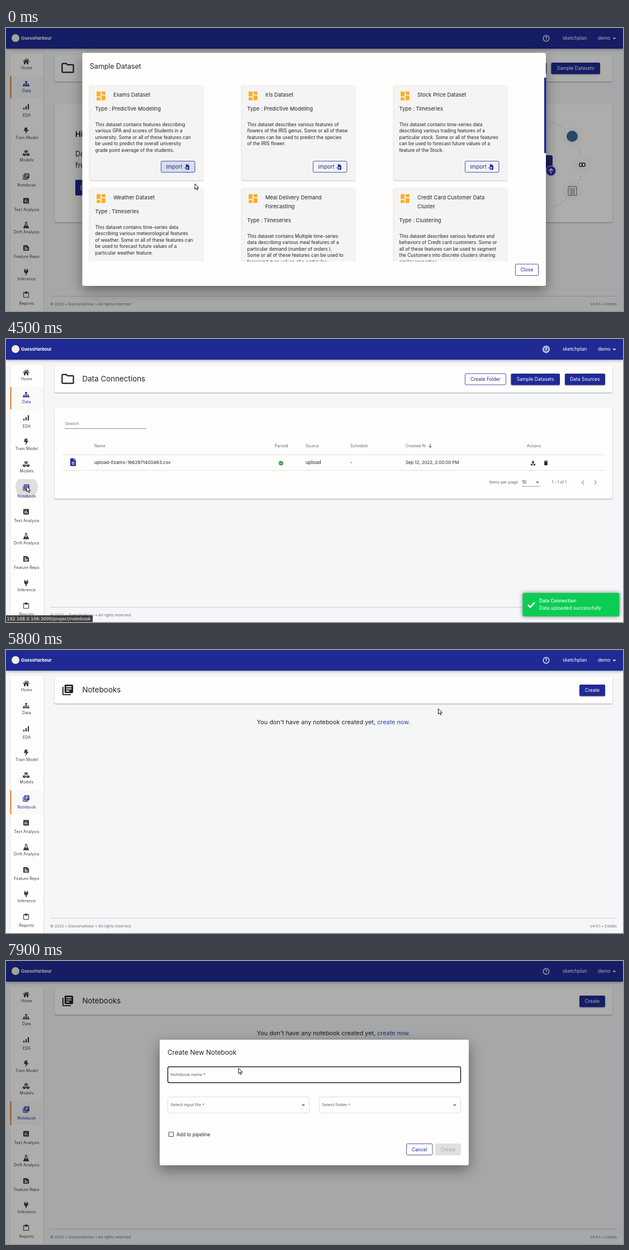
Recreate the animation shown at these times as an HTML page with a canvas. Size 1104 px wide and 507 px high, loop 8 s.

```html
<!DOCTYPE html>
<html lang="en">
<head>
<meta charset="utf-8">
<style>
html, body { margin: 0; width: 100%; height: 100%; overflow: hidden; background: #f4f6f8; }
canvas { display: block; width: 1104px; height: 507px; }
</style>
</head>
<body>
<canvas id="stage"></canvas>
<script>
const W = 1104, H = 507, LOOP = 8000;
const NAVY = '#1f2a95', WHITE = '#fffefd', DARK = '#222', GREY = '#6b7076', PAGE = '#f4f6f8';
const BRAND = 'GuessHarbour', PROJECT = 'sketchplan', USER = 'demo';
const canvas = document.getElementById('stage');
const dpr = window.devicePixelRatio || 1;
canvas.width = W * dpr;
canvas.height = H * dpr;
const ctx = canvas.getContext('2d');

// Icons on a 24 unit grid, then the two pointers at full size
const ICONS = {
  home: 'M12 6.500l-7 6V21h5v-6h4v6h5v-8.500zM1 12L12 2.500l4 3.400V4h3v4.500l4 3.500-1.200 1.400L12 5 2.200 13.400z',
  sitemap: 'M9 3h6v5h-2v3h7v4h2v5h-6v-5h2v-2h-5v2h2v5H9v-5h2v-2H6v2h2v5H2v-5h2v-4h7V8H9z',
  bars: 'M3 15h4v6H3zM10 10h4v11h-4zM17 4h4v17h-4z',
  bolt: 'M8 2h9l-3 7h6L9 23l2.500-10H5z',
  cubes: 'M12 2l5 2.300v5L12 11.600 7 9.300v-5zM6.300 12l5 2.300v5l-5 2.300-5-2.300v-5zM17.700 12l5 2.300v5l-5 2.300-5-2.300v-5zM12 4l-3 1.200 3 1.300 3-1.300zM6.300 14l-3 1.200 3 1.300 3-1.300zM17.700 14l-3 1.200 3 1.300 3-1.300z',
  books: 'M4 6H2v14q0 2 2 2h14v-2H4zM8 2h12q2 0 2 2v12q0 2-2 2H8q-2 0-2-2V4q0-2 2-2zM9 5v2h10V5zM9 9v2h10V9zM9 13v2h6v-2z',
  chart: 'M5 3h14q2 0 2 2v14q0 2-2 2H5q-2 0-2-2V5q0-2 2-2zM7 10v7h2v-7zM11 7v10h2V7zM15 13v4h2v-4z',
  flask: 'M8 2h8v2h-1v5l6 11q1 2-1 2H4q-2 0-1-2L9 9V4H8zM11 4v6l-2 4h6l-2-4V4z',
  note: 'M5 3h10l6 6v10q0 2-2 2H5q-2 0-2-2V5q0-2 2-2zM7 8v2h5V8zM7 12v2h10v-2zM7 16v2h10v-2z',
  plug: 'M7 2h3v5h4V2h3v5h2v3h-1c0 4-2 6-4.500 6.500V22h-3v-5.500C8 16 6 14 6 10H5V7h2z',
  clipboard: 'M19 3h-4q-1-2-3-2T9 3H5q-2 0-2 2v14q0 2 2 2h14q2 0 2-2V5q0-2-2-2zM5 5h2v3h10V5h2v14H5z',
  folder: 'M10 4H4q-2 0-2 2v12q0 2 2 2h16q2 0 2-2V8q0-2-2-2h-8zM4 6h5.200l2 2H20v10H4z',
  file: 'M4 1h10v6h6v16H4zM15 1l5 5h-5zM8 11v1.600h8V11zM8 14.200v1.600h8v-1.600zM8 17.400V19h8v-1.600z',
  download: 'M10 3h4v7h4l-6 6-6-6h4zM3 16h4l5 4 5-4h4v5H3z',
  trash: 'M6 7h12v12q0 2-2 2H8q-2 0-2-2zM19 4h-3.500l-1-1h-5l-1 1H5v2h14z',
  tiles: 'M3 3h8v10H3zM3 15h8v6H3zM13 11h8v10h-8zM13 3h8v6h-8z',
  importFile: 'M7 1h8v6h6v16H7v-6h5v3l5-4.500-5-4.500v3H7zM16 1l5 5h-5zM1 14h6v3H1z',
  arrow: 'M0 0v11l2.600-2.400 1.800 3.900 1.700-.8-1.800-3.700h3.400z',
  hand: 'M3 0q1.300 0 1.300 1.500v3l4 1q1 .4.8 1.500l-.8 4H3.500L0 6.500q.6-1.200 2-.2V1.500Q1.800 0 3 0z'
};
const PATHS = Object.fromEntries(Object.entries(ICONS).map(([k, d]) => [k, new Path2D(d)]));

// label, icon, icon y, label y, item top, item bottom, link
const MENU = [
  ['Home', 'home', 60, 72, 46, 86],
  ['Data', 'sitemap', 100, 112.500, 86, 126],
  ['EDA', 'bars', 141, 157, 126, 170],
  ['Train Model', 'bolt', 184, 197, 170, 210, 'training'],
  ['Models', 'cubes', 224, 237, 210, 251, 'models'],
  ['Notebook', 'books', 266, 281.500, 251, 294, 'notebook'],
  ['Text Analysis', 'chart', 309.500, 325.500, 294, 339, 'textanalysis'],
  ['Drift Analysis', 'flask', 353, 365.500, 339, 379],
  ['Feature Repo', 'note', 394, 409.500, 379, 423],
  ['Inference', 'plug', 437, 450, 423, 464],
  ['Reports', 'clipboard', 478, 494, 464, 507]
];

const DATASETS = [
  [['Exams Dataset'], 'Predictive Modeling', ['This dataset contains features describing', 'various GPA and scores of Students in a',
    'university. Some or all of these features can', 'be used to predict the overall university', 'grade point average of the students.']],
  [['Iris Dataset'], 'Predictive Modeling', ['This dataset describes various features of', 'flowers of the IRIS genus. Some or all of these',
    'features can be used to predict the species', 'of the IRIS flower.']],
  [['Stock Price Dataset'], 'Timeseries', ['This dataset contains time-series data', 'describing various trading features of a',
    'particular stock. Some or all of these features', 'can be used to forecast future values of a', 'feature of the Stock.']],
  [['Weather Dataset'], 'Timeseries', ['This dataset contains time-series data', 'describing various meteorological features',
    'of weather. Some or all of these features can', 'be used to forecast future values of a', 'particular weather feature.']],
  [['Meal Delivery Demand', 'Forecasting'], 'Timeseries', ['This dataset contains Multiple time-series', 'data describing various meal features of a',
    'particular demand (number of orders ).', 'Some or all of these features can be used to', 'forecast future values of a particular']],
  [['Credit Card Customer Data', 'Cluster'], 'Clustering', ['This dataset describes various features and', 'behaviors of Credit card customers. Some or',
    'all of these features can be used to segment', 'the Customers into discrete clusters sharing', 'similar properties.']]
];

// time, x, y of the pointer tip
const POINTER = [
  [0, 338, 279], [400, 330, 276], [1000, 40, 196], [1200, 15, 189], [1800, 15, 190], [2200, 27, 228],
  [2700, 30, 268], [3100, 28, 312], [3600, 30, 312], [4000, 36, 267], [4300, 37, 264], [4850, 37, 264],
  [5000, 177, 227], [5450, 640, 115], [6300, 1000, 88], [6700, 1030, 72], [7200, 1030, 72], [7650, 450, 180], [7900, 416, 192], [8000, 416, 192]
];

const clamp = v => Math.max(0, Math.min(1, v));
const ramp = (t, a, b) => clamp((t - a) / (b - a));
const within = (t, a, b) => t >= a && t < b;

function rect(x, y, w, h, fill, r = 0, stroke, lw = 1) {
  ctx.beginPath();
  ctx.roundRect(x, y, w, h, r);
  if (fill) { ctx.fillStyle = fill; ctx.fill(); }
  if (stroke) { ctx.strokeStyle = stroke; ctx.lineWidth = lw; ctx.stroke(); }
}
function circle(x, y, r, fill, stroke, lw = 1) {
  rect(x - r, y - r, 2 * r, 2 * r, fill, r, stroke, lw);
}
function raised(x, y, w, h, fill = WHITE, r = 2, blur = 2, dy = 1, alpha = .35) {
  ctx.save();
  ctx.shadowColor = `rgba(0,0,0,${alpha})`;
  ctx.shadowBlur = blur * dpr;
  ctx.shadowOffsetY = dy * dpr;
  rect(x, y, w, h, fill, r);
  ctx.restore();
}
function line(points, color, lw = 1) {
  ctx.beginPath();
  points.forEach(p => ctx.lineTo(...p));
  ctx.strokeStyle = color;
  ctx.lineWidth = lw;
  ctx.stroke();
}
function text(s, x, y, size, color = DARK, { align = 'left', weight = 400, font = 'Inter', spacing = 0 } = {}) {
  ctx.font = `${weight} ${size}px "${font}", sans-serif`;
  ctx.textAlign = align;
  ctx.textBaseline = 'middle';
  ctx.letterSpacing = spacing + 'px';
  ctx.fillStyle = color;
  ctx.fillText(s, x, y);
  return ctx.measureText(s).width;
}
function icon(name, cx, cy, size, color) {
  ctx.save();
  ctx.translate(cx - size / 2, cy - size / 2);
  ctx.scale(size / 24, size / 24);
  ctx.fillStyle = color;
  ctx.fill(PATHS[name], 'evenodd');
  ctx.restore();
}
function caret(x, y, color, s = 3) {
  ctx.beginPath();
  ctx.moveTo(x - s, y - s / 2);
  ctx.lineTo(x + s, y - s / 2);
  ctx.lineTo(x, y + s / 2);
  ctx.fillStyle = color;
  ctx.fill();
}
function button(label, x, y, w, h, solid, fill = NAVY) {
  if (solid) raised(x, y, w, h, fill);
  else rect(x + .5, y + .5, w - 1, h - 1, null, 2, NAVY, .8);
  text(label, x + w / 2, y + h / 2 + .5, 8.450, solid ? '#fff' : NAVY, { align: 'center' });
}
function shade(alpha) {
  ctx.fillStyle = `rgba(0,0,0,${alpha})`;
  ctx.fillRect(0, 0, W, H);
}
// Fades the content area in from the page colour
function veil(shown) {
  ctx.globalAlpha = 1 - shown;
  rect(70, 40, W - 70, 439, PAGE);
  ctx.globalAlpha = 1;
}

function drawHeader(t) {
  raised(0, 0, W, 37, NAVY, 0, 5, 1, .4);
  circle(17, 18, 7, '#f3efe6');
  text(BRAND, 27, 19, 7.700, '#fff', { weight: 700 });
  const pulse = Math.max(0, Math.cos((t - 4600) / 1000 * Math.PI));
  circle(966.500, 18.500, 7.200, `rgba(255,255,255,${.3 * pulse})`);
  circle(966.500, 18.500, 5.300, null, '#fff', 1.200);
  text('?', 966.500, 19, 8, '#fff', { align: 'center', weight: 700 });
  text(PROJECT, 996, 18.500, 8.500, '#fff');
  text(USER, 1059, 18.500, 8.500, '#fff');
  caret(1088.500, 19, '#fff');
}

function drawFooter() {
  line([[79, 480.500], [1093, 480.500]], '#cbcdcf');
  text(`© 2022 • ${BRAND} • All rights reserved`, 79, 495, 6.750, GREY);
  text('v4.9.1 • Credits', 1093, 495, 6.650, GREY, { align: 'right' });
}

function hoveredItem(t, p) {
  return within(t, 950, 4850) && p[0] < 67 ? MENU.findIndex(m => p[1] + 3 >= m[4] && p[1] + 3 < m[5]) : -1;
}

function drawSidebar(t, hovered) {
  raised(8, 46, 59.500, 470, WHITE, 0, 2, 0, .15);
  const active = t < 4600 ? 1 : 5;
  const [, , , , top, bottom] = MENU[active];
  rect(8, top, 59, bottom - top, 'rgba(0,0,0,.02)');
  if (within(t, 4400, 5100)) {
    ctx.save();
    ctx.beginPath();
    ctx.rect(8, 251, 59, 43);
    ctx.clip();
    circle(37, 265, 20 * (t - 4400) / 100, `rgba(0,0,0,${.12 * (1 - ramp(t, 4780, 5100))})`);
    ctx.restore();
  }
  rect(7.500, top, 2, bottom - top, '#e07c1c');
  MENU.forEach(([label, name, iconY, labelY], i) => {
    const color = i === active || i === hovered ? NAVY : '#3b3b3b';
    icon(name, 36, iconY, 13.500, color);
    text(label, 37, labelY, 6.900, color, { align: 'center', spacing: .2 });
  });
}

function drawTitleCard(name, title) {
  raised(87, 48, 998, 48);
  icon(name, 110.500, 71.500, name === 'folder' ? 27 : 23, DARK);
  text(title, 136.500, 72, 13.400);
}

function drawEmptyPage() {
  drawTitleCard('folder', 'Data Connections');
  button('Data Sources', 880, 62, 87, 20, true);
  button('Sample Datasets', 975.500, 62, 87.500, 20.500, true);
  raised(87, 137, 998, 211);
  text('Hi', 124, 191, 13, DARK, { weight: 700 });
  text('Do', 124, 226, 12.500);
  text('fru', 124, 246, 12.500);
  rect(124, 272, 60, 28, NAVY, 2);
  rect(134, 282, 8, 8, null, 1, '#fff');
  ctx.setLineDash([2, 4]);
  ctx.beginPath();
  ctx.arc(950, 245, 81, -1.300, 1.300);
  ctx.strokeStyle = '#999';
  ctx.lineWidth = 1;
  ctx.stroke();
  ctx.setLineDash([]);
  for (const [x, y] of [[1013, 194], [1031, 245], [1013, 292]]) circle(x, y, 17, '#fafafa');
  circle(1013, 194, 10, '#386b96');
  rect(1026, 242, 5, 6, null, 2, DARK, 1.500);
  rect(1031, 242, 5, 6, null, 2, DARK, 1.500);
  rect(1006, 284, 15, 16, null, 1, '#555');
  for (let y = 288; y < 299; y += 3) line([[1009, y], [1018, y]], '#555');
  rect(955, 228, 23, 24, '#292a83', 3);
  circle(975, 256, 9, '#3830b5', '#eee');
  line([[971, 256], [975, 252], [979, 256]], '#fff', 1.500);
  line([[975, 252], [975, 261]], '#fff', 1.500);
}

function drawDataPage() {
  drawTitleCard('folder', 'Data Connections');
  button('Create Folder', 821, 61.500, 74, 21, false);
  button('Sample Datasets', 903.500, 62, 87.500, 20.500, true);
  button('Data Sources', 1000, 62, 72, 20.500, true);
  raised(87, 124, 998, 162);
  text('Search', 105.500, 152, 8.100, '#777', { font: 'Roboto' });
  line([[105, 160.500], [251, 160.500]], '#8b8b8b');
  const head = [['Name', 158], ['Parsed', 481], ['Source', 536], ['Schedule', 616], ['Created At', 715], ['Actions', 932]];
  head.forEach(([s, x]) => text(s, x, 191.500, 7.200, '#666'));
  line([[759, 187.500], [759, 194.500]], '#444');
  line([[756, 191.500], [759, 194.500], [762, 191.500]], '#444');
  for (const y of [207.500, 235.500]) line([[101, y], [1071, y]], '#deddde');
  icon('file', 120, 220.500, 15, NAVY);
  text('upload-Exams-1662971400463.csv', 158, 221.500, 8.150);
  circle(492, 222.500, 4, '#1fa83c');
  line([[490, 222.500], [491.500, 224], [494, 221]], '#fff');
  text('upload', 536, 221.500, 8.600);
  text('-', 616, 221.500, 8.500);
  text('Sep 12, 2022, 2:00:00 PM', 715, 221.500, 7.800);
  icon('download', 943, 222, 11, DARK);
  icon('trash', 966, 222, 11, DARK);
  text('Items per page:', 865, 257, 7.150, '#666');
  text('10', 923.500, 257, 7.150);
  caret(951, 257, '#666');
  line([[923, 264], [956, 264]], '#999');
  text('1 – 1 of 1', 976.500, 256.500, 6.900, '#666');
  line([[1034, 253.500], [1030.500, 257], [1034, 260.500]], '#999', 1.200);
  line([[1053, 253.500], [1056.500, 257], [1053, 260.500]], '#999', 1.200);
}

function drawNotebookPage(t) {
  drawTitleCard('books', 'Notebooks');
  const ready = t >= 5700;
  const [lead, link] = ready ? ["You don't have any notebook created yet, ", 'create now.'] : ['Please upload dataset to create a new notebook, ', 'upload now.'];
  ctx.font = '400 10.800px "Inter", sans-serif';
  ctx.letterSpacing = '0px';
  const x = 586 - ctx.measureText(lead + link).width / 2;
  text(link, x + text(lead, x, 130, 10.800), 130, 10.800, '#2a3fa8');
  if (ready) button('Create', 1026, 62, 46, 20.500, true, within(t, 6650, 7250) ? '#141d66' : NAVY);
  if (within(t, 6850, 7200)) {
    rect(1013, 90.500, 72, 18, '#656565', 2);
    text('Create notebook', 1049, 100, 7.850, '#fff', { align: 'center' });
  }
}

function drawLoader(t) {
  shade(.09);
  for (let i = -2; i <= 2; i++) {
    const h = 11 + 4.500 * Math.cos((t - 4800) / 130 + (2 - Math.abs(i)) * 2.200);
    rect(550.200 + i * 4.600, 252 - h / 2, 2.400, h, NAVY, 1);
  }
}

function drawDatasetCard([title, type, lines], i) {
  const x = 149 + (i % 3) * 272, y = 102 + Math.floor(i / 3) * 184;
  const extra = (title.length - 1) * 16;
  raised(x + .5, y + .5, 203.500, 170.500 + extra, '#f4f4f4', 3, 2, 1, .25);
  icon('tiles', x + 21, y + 19.500, 21, '#f9b122');
  title.forEach((s, k) => text(s, x + 43, y + 18 + k * 16.500, 9.450));
  text('Type : ' + type, x + 10.500, y + 43.500 + extra, 9.350);
  lines.forEach((s, k) => text(s, x + 10.500, y + 71.500 + extra + k * 11.500, 8.250));
  rect(x + 128.500, y + 136.500, 60.500, 20, i ? null : '#d9dde9', 2, NAVY, .8);
  text('Import', x + 137.500, y + 147, 9.600, NAVY);
  icon('importFile', x + 175, y + 147, 10.500, NAVY);
}

function drawSampleDialog() {
  shade(.32);
  raised(136.500, 44.500, 829.500, 417.500, WHITE, 3, 24, 8, .4);
  text('Sample Dataset', 150, 69, 12.400);
  ctx.save();
  ctx.beginPath();
  ctx.rect(137, 89, 829, 329);
  ctx.clip();
  DATASETS.forEach(drawDatasetCard);
  ctx.restore();
  rect(963, 89, 3.500, 135, NAVY);
  button('Close', 911, 422.500, 42, 21.500, false);
}

function drawCreateDialog(t) {
  const k = ramp(t, 7200, 7380);
  shade(.32 * ramp(t, 7200, 7400));
  const scale = .7 + .3 * (1 - (1 - k) ** 3);
  ctx.save();
  ctx.globalAlpha = k;
  ctx.translate(551.500, 253.500);
  ctx.scale(scale, scale);
  ctx.translate(-551.500, -253.500);
  raised(275, 141, 553, 225, WHITE, 3, 24, 8, .4);
  text('Create New Notebook', 289, 164.500, 11.800);
  rect(289.500, 189.500, 524, 28.500, null, 3, DARK, 1.500);
  text('Notebook name *', 294.500, 204, 8, '#666', { font: 'Roboto' });
  [['Select input file *', 289], ['Select folder *', 560]].forEach(([s, x]) => {
    rect(x + .5, 243.500, 253, 29, null, 3, '#dddddc');
    text(s, x + 5.500, 258, 8.050, '#666', { font: 'Roboto' });
    caret(x + 243, 258.500, '#6b6b6b');
  });
  rect(291.500, 306.500, 8, 8, null, 1, '#555', 1.200);
  text('Add to pipeline', 305, 311, 8.500);
  button('Cancel', 716, 327, 47.500, 21, false);
  rect(768, 327, 46, 21, '#e0e0df', 2);
  text('Create', 791, 338, 8.500, '#a9a9a9', { align: 'center' });
  ctx.restore();
}

function drawToast() {
  raised(924.500, 455, 173, 42, '#0bcd53', 2, 7, 0, .5);
  line([[934, 476.500], [938, 480.500], [946, 472]], '#fff', 2.600);
  text('Data Connection', 954, 469.500, 8.300, '#fff', { weight: 500 });
  text('Data uploaded successfully', 954, 482.500, 8.500, '#fff');
}

function drawStatus(t, hovered) {
  const page = MENU[hovered] && MENU[hovered][6];
  if (!page || t < 1150) return;
  const url = '192.168.0.106:3000/project/' + page;
  ctx.save();
  ctx.globalAlpha = .9 * ramp(t, 1150, 1420);
  ctx.font = '7.900px "DejaVu Sans", sans-serif';
  ctx.letterSpacing = '0px';
  rect(0, 495, ctx.measureText(url).width + 5, 12, '#2c2c2c', [0, 2, 0, 0]);
  ctx.globalAlpha = 1;
  text(url, 1.500, 501.500, 7.900, '#fff', { font: 'DejaVu Sans' });
  ctx.restore();
}

function pointerAt(t) {
  const i = Math.max(1, POINTER.findIndex(p => p[0] > t));
  const [a, b] = [POINTER[i - 1], POINTER[i]];
  const k = ramp(t, a[0], b[0]), e = k * k * (3 - 2 * k);
  return [a[1] + (b[1] - a[1]) * e, a[2] + (b[2] - a[2]) * e];
}

function drawPointer(t, [x, y], hovered) {
  const hand = hovered >= 0 && t < 4380 || within(t, 6650, 7200);
  const path = PATHS[hand ? 'hand' : 'arrow'];
  ctx.save();
  ctx.translate(x, y);
  if (!hand) ctx.scale(.9, .9);
  ctx.fillStyle = '#fff';
  ctx.strokeStyle = '#111';
  ctx.lineWidth = 1.100;
  ctx.fill(path);
  ctx.stroke(path);
  ctx.restore();
}

function draw(t) {
  const pointer = pointerAt(t), hovered = hoveredItem(t, pointer);
  ctx.setTransform(dpr, 0, 0, dpr, 0, 0);
  ctx.fillStyle = PAGE;
  ctx.fillRect(0, 0, W, H);
  drawFooter();
  drawSidebar(t, hovered);
  if (t < 250) drawEmptyPage();
  else if (t < 4600) {
    drawDataPage();
    veil(ramp(t, 500, 900));
  } else {
    drawNotebookPage(t);
    veil(ramp(t, 4780, 5400));
  }
  drawHeader(t);
  if (t < 250) drawSampleDialog();
  if (within(t, 250, 550) || within(t, 4600, 4900)) drawLoader(t);
  if (t >= 7200) drawCreateDialog(t);
  if (within(t, 450, 5400)) drawToast();
  drawStatus(t, hovered);
  drawPointer(t, pointer, hovered);
}

function tick(now) {
  draw(now % LOOP);
  requestAnimationFrame(tick);
}
requestAnimationFrame(tick);
</script>
</body>
</html>
```
